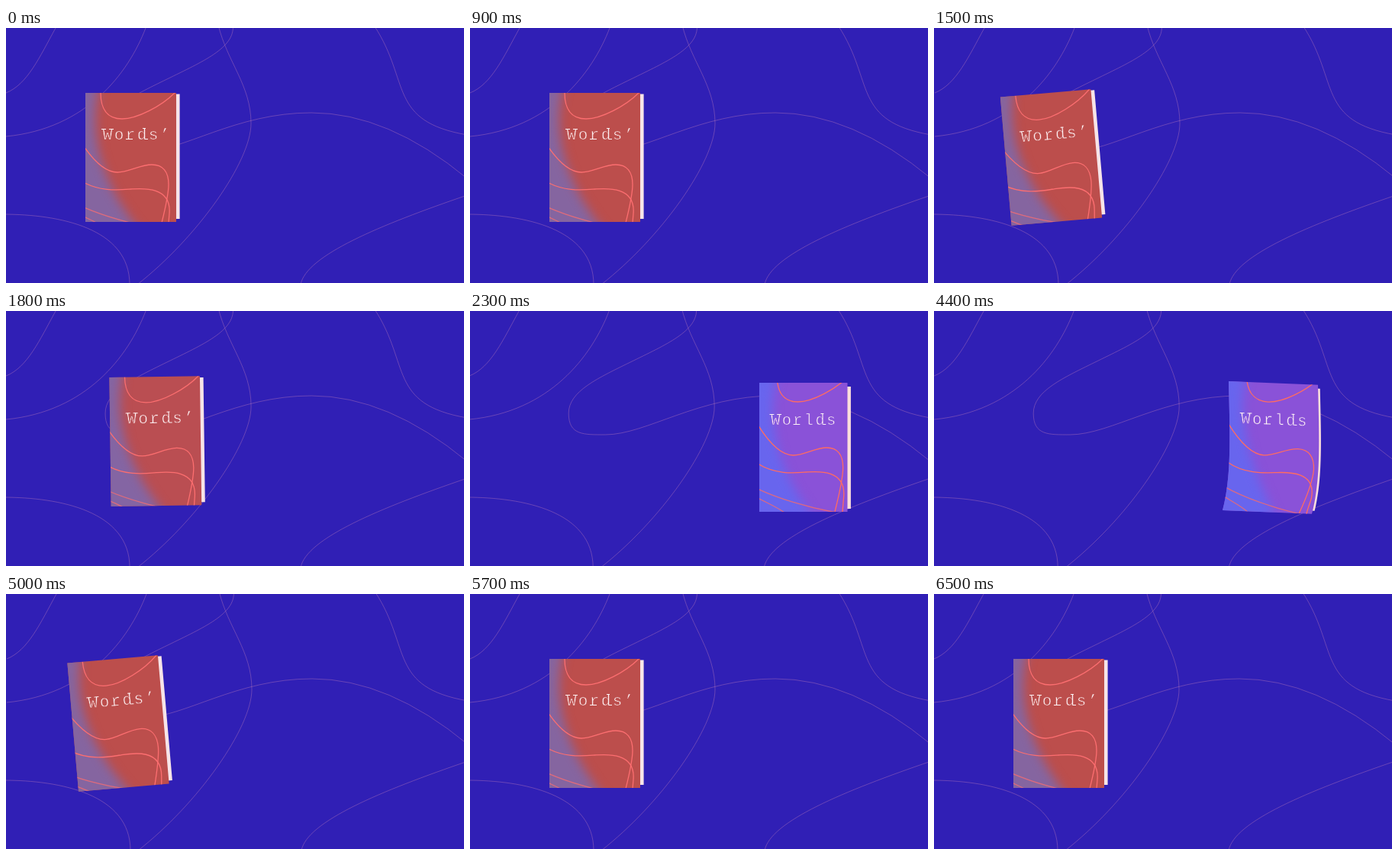
An HTML page with a canvas that plays this animation: 600x334 px, repeating every 6600 ms.

```html
<!DOCTYPE html>
<html lang="en">
<head>
<meta charset="utf-8">
<title>Words' / Worlds</title>
<style>
html, body { margin: 0; width: 100%; height: 100%; overflow: hidden; background: #301fb5; }
canvas { display: block; width: 600px; height: 334px; }
</style>
</head>
<body>
<canvas id="stage" width="600" height="334"></canvas>
<script>
const ctx = document.getElementById('stage').getContext('2d');
const LOOP = 6600, STEP = 100, FLIGHT = 600;
const W = 119, H = 169;
const LEFT = { x: 163.5, y: 169.5 }, RIGHT = { x: 434.5, y: 178.5 };

const threads = [
  'M65 0C44 38 28 74 0 85',
  'M183 0C160 60 105 132 0 142',
  'M297 -6C302 24 262 42 215 65S130 105 130 134S150 162 178 162C232 162 300 111 400 111Q500 111 604 197',
  'M278 -4C290 45 321 75 321 125S250 275 172 336',
  'M-4 244C70 244 162 262 162 336',
  'M483 -2C530 70 500 122 604 140',
  'M604 219C490 258 393 298 386 336'
].map(d => new Path2D(d));

// Cover curves: start, control, then pairs of (control, end) joined smoothly
const curves = [
  [20, 0, 20, 20, 28, 34, 48, 34, 100, 17, 117, 0],
  [-6, 64, 12, 92, 28, 104, 42, 104, 72, 94, 87, 94, 109, 104, 109, 120, 103, 158, 98, 178],
  [-6, 115, 18, 130, 45, 127, 60, 126, 113, 122, 110, 158, 109, 172, 108, 178]
];
for (const n of [0, 1]) curves.push([-6, 148 + 12 * n, 20 - 10 * n, 160 + 8 * n, 60 - 40 * n, 172, 100 - 70 * n, 179]);

const clamp = v => Math.max(0, Math.min(1, v));
const ease = (v, a, b) => { const u = clamp((v - a) / (b - a)); return u * u * (3 - 2 * u); };
const mix = (a, b, k) => a + (b - a) * k;
const tint = (a, b, k) => `rgb(${a.map((v, i) => Math.round(mix(v, b[i], k))).join()})`;

// One jump: pull back, accelerate across, overshoot, settle
function jump(t, launch) {
  const s = t - launch, u = clamp(s / FLIGHT);
  return {
    go: u ** 3,
    pull: ease(s, -600, 0) * (1 - ease(s, 0, 400)),
    over: ease(s, 400, 600) * (1 - ease(s, 600, 860)),
    dye: ease(u, 0.45, 0.85)
  };
}

function pose(t) {
  const out = jump(t, 1500), back = jump(t, 4400);
  const side = out.go - back.go, bend = back.pull;
  return {
    x: mix(LEFT.x, RIGHT.x, side) + 10 * (back.pull - out.pull) + 16.5 * (out.over - back.over),
    y: mix(LEFT.y, RIGHT.y, side) - 2 * bend,
    tilt: -5 * (out.pull + back.over),
    width: mix(W, 115.5, side) + 1.5 * bend,
    pages: 4.6 - 3.2 * (ease(t, 2200, 2900) - back.go) + 1.2 * bend,
    bend,
    dye: out.dye - back.dye,
    drift: out.pull + back.pull + back.over - 0.8 * side
  };
}

function drawThreads(drift) {
  ctx.save();
  ctx.translate(drift, 0);
  ctx.strokeStyle = 'rgba(190,125,185,0.4)';
  ctx.lineWidth = 1;
  threads.forEach(p => ctx.stroke(p));
  ctx.restore();
}

function strokeCurve(c, map) {
  let [x, y, ax, ay] = c;
  ctx.beginPath();
  ctx.moveTo(...map(x, y));
  for (let i = 4; i < c.length; i += 4) {
    const [bx, by, ex, ey] = c.slice(i, i + 4);
    ctx.bezierCurveTo(...map(ax, ay), ...map(bx, by), ...map(ex, ey));
    ax = 2 * ex - bx;
    ay = 2 * ey - by;
  }
  ctx.stroke();
}

// Thin typewriter letters: trimmed glyphs plus slab serifs
function drawWord(word, ground) {
  ctx.font = '21px "Liberation Mono", "Courier New", monospace';
  ctx.textAlign = 'center';
  ctx.fillStyle = '#fff4f6';
  ctx.strokeStyle = ground;
  ctx.lineWidth = 0.6;
  [...word].forEach((c, i) => {
    const x = i * 15 + 7.5;
    ctx.fillText(c, x, 0);
    ctx.strokeText(c, x, 0);
    const slab = (dx, y, w) => ctx.fillRect(x + dx, y, w, 1);
    if (c === 'W') { slab(-8, -14, 6); slab(2, -14, 6); }
    if (c === 'r') slab(-6, -1, 9);
    if (c === 'd') { slab(1, -15, 4); slab(4, -1, 4); }
  });
}

function drawBook(b) {
  const p = b.dye, sx = b.width / W, shear = 0.04 * b.bend;
  const sway = y => b.bend * (4 * y / H - 12 * (y / H) ** 4);
  const warp = (x, y) => [x * sx + sway(y), y + shear * x];
  // Area between two edges given as functions of height
  const panel = (left, right, top, bottom) => {
    const n = 24, at = i => mix(top, bottom, i / n);
    ctx.beginPath();
    for (let i = 0; i <= n; i++) ctx.lineTo(...warp(right(at(i)), at(i)));
    for (let i = n; i >= 0; i--) ctx.lineTo(...warp(left, at(i)));
    ctx.closePath();
  };

  ctx.save();
  ctx.translate(b.x, b.y);
  ctx.rotate(b.tilt * Math.PI / 180);
  ctx.translate(-b.width / 2, -H / 2);

  panel(60, () => W + b.pages / sx, mix(1.5, 5, p), 165);
  ctx.fillStyle = tint([247, 228, 232], [252, 222, 220], p);
  ctx.fill();

  const ground = tint([188, 78, 76], [138, 82, 216], p);
  panel(0, () => W, 0, H);
  ctx.fillStyle = ground;
  ctx.fill();
  ctx.clip();

  ctx.filter = 'blur(7px)';
  panel(-30, y => 13 + 5 * p + (y - 35) ** 2 / 365, -30, 200);
  ctx.fillStyle = tint([133, 101, 160], [104, 101, 238], p);
  ctx.fill();
  ctx.filter = 'none';

  ctx.strokeStyle = tint([252, 110, 112], [255, 107, 98], p);
  ctx.lineWidth = 1.3;
  curves.forEach((c, n) => {
    ctx.globalAlpha = n > 2 ? 0.75 : 1;
    strokeCurve(c, (x, y) => warp(x + 4 * p, y - 9 * p));
  });
  ctx.globalAlpha = 1;

  const base = mix(61, 55, p);
  ctx.transform(sx, shear, 0, 1, sway(base) + mix(21.5, 14, p), base);
  drawWord(p < 0.5 ? 'Words\u2019' : 'Worlds', ground);
  ctx.restore();
}

function frame(now) {
  const b = pose(Math.floor((now % LOOP) / STEP) * STEP);
  ctx.fillStyle = '#301fb5';
  ctx.fillRect(0, 0, 600, 334);
  drawThreads(b.drift);
  drawBook(b);
  requestAnimationFrame(frame);
}
frame(0);
</script>
</body>
</html>
```
